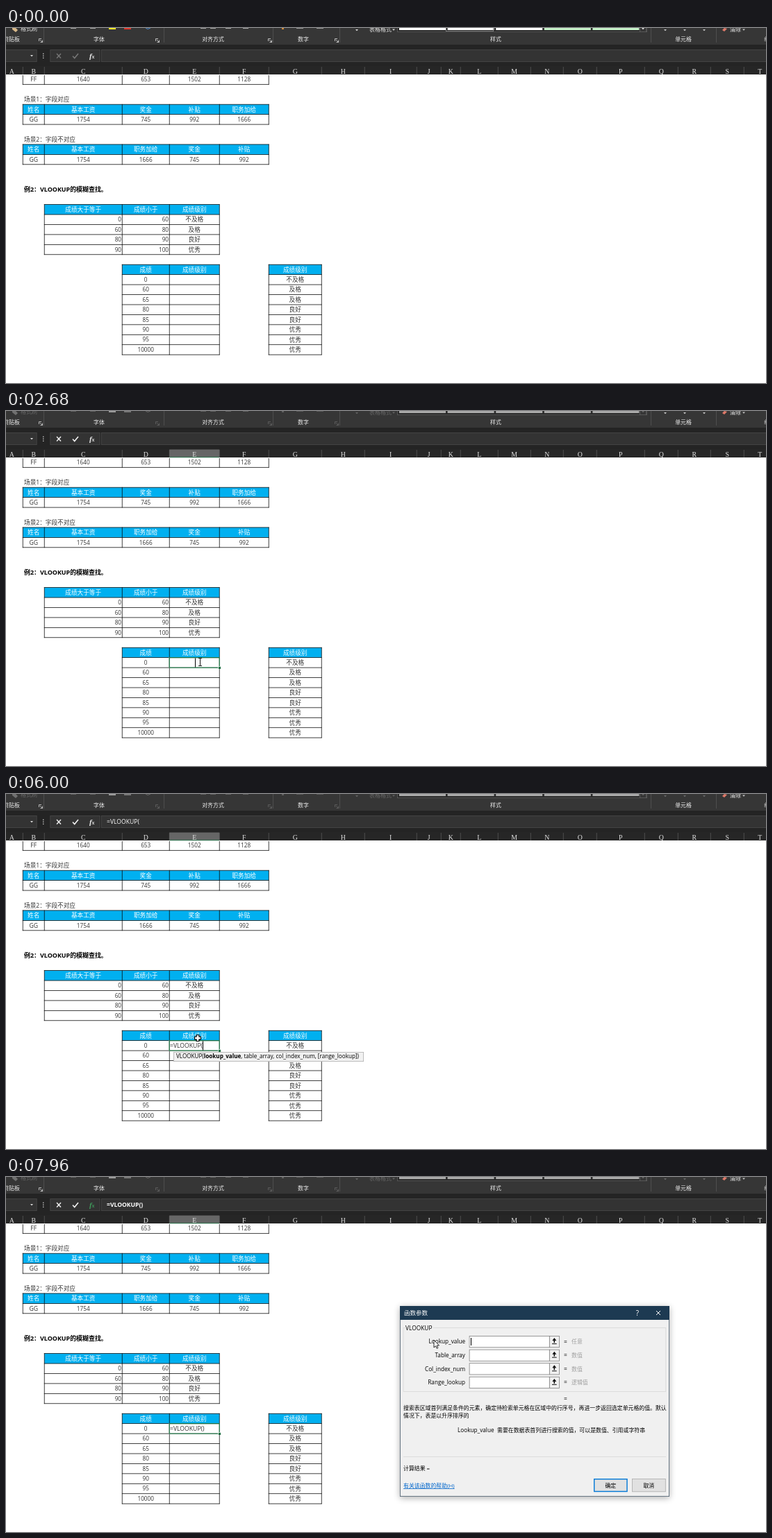
Recreate the animation shown at these times as an HTML page with a canvas. Size 1094 px wide and 512 px high, loop 8 s.

```html
<!DOCTYPE html>
<html lang="zh-CN">
<head>
<meta charset="utf-8">
<title>VLOOKUP</title>
<style>
html, body { margin: 0; width: 100%; height: 100%; overflow: hidden; background: #fff; }
canvas { display: block; }
</style>
</head>
<body>
<canvas id="stage" width="1094" height="512"></canvas>
<script>
const g = document.getElementById('stage').getContext('2d');
const LOOP = 8000, EDIT = 2290, POP = 5520, DIALOG = 7340;
const SANS = '"Open Sans", "Noto Sans CJK SC", "Noto Sans CJK", sans-serif';
const SERIF = '"Liberation Serif", serif';
const GREEN = '#1f6f43', BLUE = '#0078d7', INK = '#333';
const THIN = 0.75;
const COLS = [-8, 24, 55, 167, 235, 307, 378, 454, 516, 591, 626, 654, 708,
  755, 802, 850, 919, 967, 1014, 1062, 1108];
const TYPED = [[0, ''], [3390, '='], [3810, '=v'], [4130, '=vl'], [4300, '=vlo'],
  [4470, '=vloo'], [POP, '=VLOOKUP('], [DIALOG, '=VLOOKUP()']];
const CARET_ON = [[EDIT, 2920], [3390, 4900], [POP, 6140], [6670, 7200]];
const ABOUT = '搜索表区域首列满足条件的元素，确定待检索单元格在区域中的行序号，再进一步返回选定单元格的值。';

// centres of the grid lines
const colX = c => COLS[c] + 0.2;
const rowY = k => 81.3 + 14.44 * k;
const rowMid = k => rowY(k + 0.5);

function box(x, y, w, h, color) {
  g.fillStyle = color;
  g.fillRect(x, y, w, h);
}

function frame(x, y, w, h, fill, edge, line = 0.8) {
  if (fill) box(x, y, w, h, fill);
  g.strokeStyle = edge;
  g.lineWidth = line;
  g.strokeRect(x + line / 2, y + line / 2, w - line, h - line);
}

// y is the vertical middle of the line
function text(s, x, y, o = {}) {
  const size = o.size || 8.65;
  g.font = `${o.style || 'normal'} ${o.weight || 400} ${size}px ${o.font || SANS}`;
  g.textAlign = o.align || 'left';
  g.fillStyle = o.color || '#000';
  g.fillText(s, x, y + size * 0.36);
  return g.measureText(s).width;
}

function stroke(points, color, width = 1) {
  g.beginPath();
  points.forEach(([x, y], i) => i ? g.lineTo(x, y) : g.moveTo(x, y));
  g.strokeStyle = color;
  g.lineWidth = width;
  g.stroke();
}

function shape(points, fill) {
  g.beginPath();
  points.forEach(([x, y]) => g.lineTo(x, y));
  g.closePath();
  g.fillStyle = fill;
  g.fill();
}

const drop = (x, y, color) => shape([[x - 2, y - 1], [x + 2, y - 1], [x, y + 1.2]], color);

function launcher(x, y, color) {
  stroke([[x - 2.5, y + 1], [x - 2.5, y - 2.5], [x + 1, y - 2.5]], color, 0.8);
  stroke([[x - 1, y - 1], [x + 2.5, y + 2.5], [x + 2.5, y - 0.5]], color, 0.8);
  stroke([[x - 0.5, y + 2.5], [x + 2.5, y + 2.5]], color, 0.8);
}

function ribbon(t) {
  const mix = t < 2370 ? 0 : t < 2680 ? 1 : 2;
  const pick = (...c) => c[mix];
  box(0, 0, 1094, 24, '#363636');
  for (const x of [54, 227, 384, 480, 928, 1022]) box(x, 0, 0.8, 21, '#555');
  const labels = [['剪贴板', 8], ['字体', 134], ['对齐方式', 298], ['数字', 428], ['样式', 705], ['单元格', 975]];
  for (const [s, x] of labels) text(s, x, 16.5, { size: 7.9, align: 'center', color: '#eee' });
  const dim = pick('#e2e2e2', '#a0a0a0', '#656565');
  [50, 218, 380, 476].forEach((x, i) => launcher(x, 18, i ? dim : '#d8d8d8'));

  text('格式刷', 21, 1.5, { size: 8, color: dim });
  shape([[9, 0], [14, 0], [17, 3], [14, 6], [9, 2]], pick('#d9b98a', '#a29586', '#707070'));
  box(148, 0, 10, 2, pick('#ffe928', '#c9c270', '#9c9c9c'));
  box(170, 0, 10, 2, pick('#e0382e', '#a85c58', '#777'));
  stroke([[201, 0], [204, 1.5], [208, 0]], pick('#4f8fd6', '#66809c', '#6a6a6a'));
  for (const x of [93, 121, 280, 294, 316, 341]) box(x, 0, 8, 1, pick('#aaa', '#888', '#606060'));
  box(397, 0, 3, 2, pick('#d08a3a', '#8c7355', '#606060'));
  for (const x of [418, 447]) box(x, 0, 10, 1, pick('#999', '#777', '#585858'));
  drop(505, 3, dim);
  text('表格格式', 523, 2, { size: 8, color: dim });
  drop(558, 2.5, dim);

  frame(563, -2, 360, 8, '#2a2a2a', '#5c5c5c');
  for (let i = 0; i < 5; i++) {
    const bright = i < 3 ? '#fff' : '#c6f2c9';
    box(566 + i * 69.6, 0, 67, 3, pick(bright, '#d2d2d2', '#a9a9a9'));
  }
  if (!mix) frame(633, -3, 69, 8, null, '#888');
  frame(912, -4, 10, 10, '#363636', '#606060');
  drop(917, 1, dim);
  const arrows = t < 3390 ? '#ccc' : '#6c6c6c';
  for (const x of [949, 977, 1005]) drop(x, 3, arrows);
  shape([[1031, 3], [1034, 0], [1038, 1], [1034, 5]], '#e07a6a');
  text('清除', 1042, 2, { size: 8, color: '#eee' });
  drop(1062, 2.5, '#ccc');
  text('纟', 1091, 16.5, { size: 8, color: '#ddd' });
}

function formulaBar(t, typed) {
  box(0, 24, 1094, 32, '#242424');
  frame(-2, 31, 46.5, 18, '#333', '#484848');
  drop(37, 40, '#ddd');
  for (const y of [36.5, 39.5, 42.5]) box(53, y, 1.4, 1.4, '#ccc');
  frame(63.5, 31, 72, 18, '#333', '#484848');
  frame(137, 31, 960, 18, '#333', '#484848');
  const c = t < EDIT ? '#777' : '#f2f2f2';
  stroke([[73, 37], [79, 43.5]], c, 1.4);
  stroke([[79, 37], [73, 43.5]], c, 1.4);
  stroke([[96, 40.5], [98.7, 43.5], [104, 37]], c, 1.6);
  const fx = t < 6970 ? '#eee' : '#3f9c5c';
  text('f', 120, 40, { size: 11, style: 'italic', weight: 700, font: SERIF, color: fx });
  text('x', 123.5, 41, { size: 8, style: 'italic', weight: 700, font: SERIF, color: fx });
  text(typed, 145, 39.7, { size: 8.6, weight: t < DIALOG ? 400 : 700, color: '#fff' });
}

function headers(active) {
  box(0, 55, 1094, 12, '#262626');
  for (let i = 0; i < 20; i++) {
    const x = colX(i), w = colX(i + 1) - x;
    if (i === active) {
      box(x, 55.5, w, 11.5, '#666');
      box(x, 66.3, w, 0.9, GREEN);
    }
    box(x + w - THIN / 2, 56, THIN, 11, '#5a5a5a');
    text(String.fromCharCode(65 + i), x + w / 2, 62.2, { size: 9.8, font: SERIF, align: 'center', color: '#e4e4e4' });
  }
}

function table(col, row, rows, head = true, right = 0) {
  const n = rows[0].length, left = colX(col), end = colX(col + n);
  const top = rowY(row), bottom = rowY(row + rows.length);
  if (head) box(left, top, end - left, rowY(row + 1) - top, '#00b0f0');
  rows.forEach((cells, r) => cells.forEach((s, c) => {
    const x = colX(col + c), x2 = colX(col + c + 1), y = rowMid(row + r);
    const white = head && r === 0;
    const o = { size: /^\d+$/.test(s) ? 8.2 : 8.65, color: white ? '#fff' : INK };
    const flush = !white && c < right;
    text(s, flush ? x2 - 1.2 : (x + x2) / 2, y, { ...o, align: flush ? 'right' : 'center' });
  }));
  const half = THIN / 2;
  for (let r = 0; r <= rows.length; r++) box(left - half, rowY(row + r) - half, end - left + THIN, THIN, '#000');
  for (let c = 0; c <= n; c++) box(colX(col + c) - half, top - half, THIN, bottom - top + THIN, '#000');
}

function sheet() {
  box(0, 67, 1094, 445, '#fff');
  g.save();
  g.beginPath();
  g.rect(0, 68, 1094, 444);
  g.clip();
  table(1, -1, [['FF', '1640', '653', '1502', '1128']], false);
  g.restore();
  text('场景1：字段对应', 26, rowMid(1), { color: INK });
  table(1, 2, [['姓名', '基本工资', '奖金', '补贴', '职务加给'], ['GG', '1754', '745', '992', '1666']]);
  text('场景2：字段不对应', 26, rowMid(5), { color: INK });
  table(1, 6, [['姓名', '基本工资', '职务加给', '奖金', '补贴'], ['GG', '1754', '1666', '745', '992']]);
  text('例2：VLOOKUP的模糊查找。', 26, rowMid(10), { size: 8.95, weight: 700 });
  table(2, 12, [['成绩大于等于', '成绩小于', '成绩级别'], ['0', '60', '不及格'],
    ['60', '80', '及格'], ['80', '90', '良好'], ['90', '100', '优秀']], true, 2);
  const scores = ['0', '60', '65', '80', '85', '90', '95', '10000'];
  table(3, 18, [['成绩', '成绩级别'], ...scores.map(s => [s, ''])]);
  const grade = s => s < 60 ? '不及格' : s < 80 ? '及格' : s < 90 ? '良好' : '优秀';
  table(6, 18, [['成绩级别'], ...scores.map(s => [grade(+s)])]);
}

function selection(col, row) {
  const line = 1.35, x2 = colX(col + 1), y2 = rowY(row + 1);
  const x = colX(col) - line / 2, y = rowY(row) - line / 2;
  frame(x, y, x2 - x + line / 2, y2 - y + line / 2, '#fff', GREEN, line);
  box(x2 - 2, y2 - 2, 4, 4, '#fff');
  box(x2 - 1.3, y2 - 1.3, 3.2, 3.2, GREEN);
}

const tip = (x, w) => frame(x, 372, w, 14, '#f1f1f1', '#b0b0b0');

function funcIcon(x, y, warn) {
  g.beginPath();
  g.arc(x, y, 5, 0, 7);
  g.fillStyle = '#fff';
  g.fill();
  g.strokeStyle = '#333';
  g.lineWidth = 0.9;
  g.stroke();
  text('fx', x, y, { size: 8, style: 'italic', font: SERIF, align: 'center' });
  if (warn) shape([[x + 2.5, y], [x + 6, y + 6], [x - 1, y + 6]], '#f08a24');
}

function suggest(x, names) {
  frame(x, 372, 68.5, names.length > 1 ? 131.5 : 16, '#fff', '#7a7a7a');
  names.forEach((s, i) => {
    const y = 380 + i * 14.45;
    if (!i) box(x + 14, 373, 54, 14, BLUE);
    funcIcon(x + 8.5, y, i > 6);
    text(s, x + 15.5, y + 0.5, { size: 8.4, color: i ? '#000' : '#fff' });
  });
}

function editor(t, typed) {
  const size = 8.65;
  g.font = `${size}px ${SANS}`;
  const w = g.measureText(typed).width;
  const x = t < POP ? 271.5 - w / 2 : 236;
  text(typed, x, rowMid(19), { size, color: INK });
  if (CARET_ON.some(([a, b]) => t >= a && t < b)) box(Math.round(x + w), 356.4, 1, 13.2, '#000');
  const left = Math.round(x + 5);
  if (typed === '=v') {
    suggest(left, ['VALUE', 'VAR.P', 'VAR.S', 'VARA', 'VARPA', 'VDB', 'VLOOKUP', 'VAR', 'VARP']);
    tip(left + 70, 151);
    text('将一个代表数值的文本字符串转换成数值', left + 74, 378.5, { size: 7.92 });
  } else if (typed.startsWith('=vl')) {
    suggest(left, ['VLOOKUP']);
    tip(left + 70, 482);
    text(ABOUT + '默认情况下，表是以升序排序的', left + 74, 378.5, { size: 7.9 });
  } else if (t >= POP && t < DIALOG) {
    tip(241, 274);
    let cx = 245;
    const parts = [['VLOOKUP(', 400], ['lookup_value', 700], [', table_array, col_index_num, [range_lookup])', 400]];
    for (const [s, weight] of parts) cx += text(s, cx, 378.5, { size: 8.15, weight });
  }
}

function dialog() {
  const small = { size: 7.9 };
  g.save();
  g.shadowColor = 'rgba(0,0,0,.32)';
  g.shadowBlur = 9;
  g.shadowOffsetY = 2;
  box(567, 186, 388, 275, '#f0f0f0');
  g.restore();
  frame(567, 186, 388, 275, '#f0f0f0', '#47596a');
  box(567, 186, 388, 20, '#1d3a52');
  text('函数参数', 573, 196, { size: 8.5, color: '#fff' });
  text('?', 909, 196, { size: 10, align: 'center', color: '#fff' });
  stroke([[936, 193], [942, 199]], '#fff');
  stroke([[942, 193], [936, 199]], '#fff');

  frame(571.7, 217, 378.5, 93, null, '#d8d8d8');
  box(574, 212, 41, 10, '#f0f0f0');
  text('VLOOKUP', 575, 217.5, { size: 8.4 });
  const args = [['Lookup_value', '任意'], ['Table_array', '数值'], ['Col_index_num', '数值'], ['Range_lookup', '逻辑值']];
  args.forEach(([name, kind], i) => {
    const y = 237.5 + i * 19.6, top = y - 8.4;
    text(name, 661, y, { size: 8.2, align: 'right' });
    frame(666.7, top, 116, 17, '#fff', '#808080');
    frame(782, top, 14.8, 17, '#f0f0f0', '#808080');
    shape([[789.3, top + 3], [792.3, top + 7], [786.3, top + 7]], '#111');
    box(788.5, top + 6, 1.6, 4, '#111');
    box(786, top + 11, 6.7, 1, '#111');
    text('=', 803, y, { size: 8.4 });
    text(kind, 814, y, { size: 7.9, color: '#a0a0a0' });
  });
  box(669, 232, 1, 11, '#000');
  text('=', 803, 320, { size: 8.4 });
  text(ABOUT + '默认', 572, 333.3, small);
  text('情况下，表是以升序排序的', 572, 344.3, small);
  text('Lookup_value', 650, 365.3, { size: 8.2 });
  text('需要在数据表首列进行搜索的值，可以是数值、引用或字符串', 707, 365.3, small);
  box(572, 403, 378, 0.8, '#d8d8d8');
  text('计算结果 =', 572, 420, small);
  const w = text('有关该函数的帮助(H)', 572, 445, { size: 7.9, color: '#0066cc' });
  box(572, 449, w, 0.8, '#0066cc');
  frame(846, 435, 48.7, 19.2, '#e1e1e1', BLUE, 1.4);
  frame(901, 435, 48.7, 19.2, '#e1e1e1', '#adadad');
  text('确定', 870.3, 444.8, { size: 7.9, align: 'center' });
  text('取消', 925.3, 444.8, { size: 7.9, align: 'center' });
}

// curved moves: start, end, from, control, to
const MOVES = [
  [70, 940, [824, 473], [450, 280], [279, 361]],
  [5920, 6720, [279, 363], [230, 170], [158, 46]],
  [6720, 6970, [158, 46], [145, 42], [130, 42]],
  [7350, 7570, [130, 42], [165, 66], [214, 96]],
  [7570, 7950, [214, 96], [400, 165], [616, 235]]
];

function pointer(t) {
  const now = Math.floor(t / 75) * 75;
  let pos = MOVES[0][2];
  for (const [a, b, p, c, q] of MOVES) {
    if (now < a) break;
    const u = Math.min(1, (now - a) / (b - a)), k = u * u * (3 - 2 * u);
    pos = p.map((v, i) => (1 - k) ** 2 * v + 2 * k * (1 - k) * c[i] + k * k * q[i]);
  }
  return pos;
}

function cursor(t) {
  if (t < 70) return;
  const [x, y] = pointer(t);
  g.save();
  g.translate(Math.round(x), Math.round(y));
  if (t >= EDIT && t < 5920) {
    g.translate(0, 1);
    stroke([[0.5, -6], [0.5, 6]], '#222', 1.1);
    for (const s of [-5.5, 5.5]) stroke([[-2, s], [3, s]], '#222');
  } else if (t < DIALOG && y > 67) {
    box(-2.5, -5, 5, 10, '#000');
    box(-5, -2.5, 10, 5, '#000');
    box(-1.3, -4, 2.6, 8, '#fff');
    box(-4, -1.3, 8, 2.6, '#fff');
  } else {
    const arrow = [[0, 0], [0, 11], [2.5, 8.7], [4.2, 12.3], [5.8, 11.6], [4.2, 8], [7.5, 8]];
    shape(arrow, '#fff');
    stroke([...arrow, arrow[0]], '#111', 0.9);
  }
  g.restore();
}

function draw(t) {
  const typed = TYPED.filter(([at]) => at <= t).pop()[1];
  const active = t < 940 ? -1 : t < 1260 ? 14 : 4;
  ribbon(t);
  formulaBar(t, typed);
  sheet();
  headers(active);
  if (active > 0) selection(active, active === 14 ? 15 : 19);
  if (t >= EDIT) editor(t, typed);
  if (t >= DIALOG) dialog();
  cursor(t);
}

const start = performance.now();
function tick() {
  draw((performance.now() - start) % LOOP);
  requestAnimationFrame(tick);
}
tick();
</script>
</body>
</html>
```
